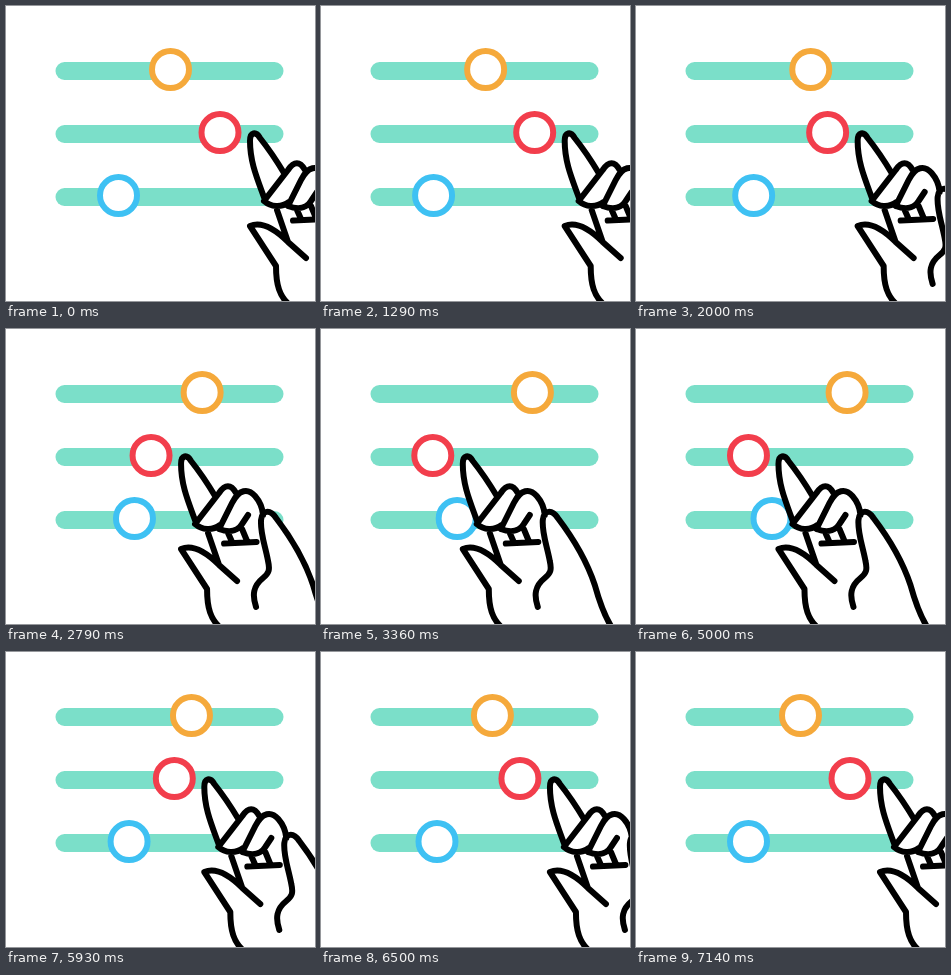
Write an HTML page with a canvas that moves like this. It is 309 px wide and 295 px high and loops after 7.21 s.

```html
<!DOCTYPE html>
<html lang="en">
<head>
<meta charset="utf-8">
<title>Sliders</title>
<style>
html, body { margin: 0; width: 100%; height: 100%; overflow: hidden; background: #fff; }
canvas { display: block; }
</style>
</head>
<body>
<canvas id="stage" width="309" height="295"></canvas>
<script>
const ctx = document.getElementById('stage').getContext('2d');
const LOOP = 7210, START = 1200, TURN = 4172, END = 7143, FPS = 14;

// Each knob travels from x to x + travel and back.
const sliders = [
  { y: 65, x: 164.5, travel: 57.5, color: '#f5a93b' },
  { y: 128, x: 214, travel: -125.3, color: '#f23e4c' },
  { y: 191, x: 112.5, travel: 29, color: '#3ec1f3' }
];

// The hand is drawn relative to a red knob at x = 91.
const HAND_X = 91;
const body = new Path2D(
  'M162 300C150 291 147 278 147 260L121 220C133 215 147 224 159 236' +
  'L148 203L135 195C127 172 121 156 121 135C121 127 127 125 131 132' +
  'Q143 147 155 167C162 158 169 153 176 164C182 160 187 161 192 164' +
  'C199 170 203 178 203 185C207 180 211 182 216 189' +
  'C232 210 245 232 253 256Q261 285 271 300Z');
const lines = new Path2D(
  // index finger
  'M136 194C128 172 121 156 121 135C121 126 127 125 131 132Q143 147 155 167' +
  // folded middle finger
  'M135 195L159 164C165 155 171 155 176 164' +
  'M135 195C142 201 152 202 160 196' +
  // folded ring finger
  'M159 200L172 174C179 160 188 159 195 167Q202 175 203 186' +
  'M159 200C172 205 179 200 182 195L188 186' +
  // knuckle marks
  'M168 204L172 213M182 200L187 212M164 214.5L196.500 213' +
  // thumb and wrist
  'M148 204L159 236' +
  'M177 252L159 236C147 224 133 215 121 220L147 260C147 278 150 291 162 300' +
  // little finger and outer edge
  'M196 278C192 266 193 257 203 249C209 244 210 241 208 232' +
  'C205 216 200 204 201 191C202 181 210 180 216 189' +
  'C232 210 245 232 253 256Q261 285 271 300');

const ease = p => p * p * (3 - 2 * p);
const clamp = p => Math.min(1, Math.max(0, p));

function progress(t) {
  return t < TURN
    ? ease(clamp((t - START) / (TURN - START)))
    : ease(clamp((END - t) / (END - TURN)));
}

function drawBar(y) {
  ctx.strokeStyle = '#7bdfc9';
  ctx.lineWidth = 18;
  ctx.beginPath();
  ctx.moveTo(58.5, y);
  ctx.lineTo(268.5, y);
  ctx.stroke();
}

function drawKnob(x, y, color) {
  ctx.beginPath();
  ctx.arc(x, y, 18.5, 0, Math.PI * 2);
  ctx.fillStyle = '#fff';
  ctx.fill();
  ctx.strokeStyle = color;
  ctx.lineWidth = 6;
  ctx.stroke();
}

function drawHand(dx) {
  ctx.save();
  ctx.translate(dx, 0);
  ctx.fillStyle = '#fff';
  ctx.fill(body);
  ctx.strokeStyle = '#000';
  ctx.lineWidth = 6;
  ctx.stroke(lines);
  ctx.restore();
}

function draw(t) {
  const p = progress(t);
  ctx.fillStyle = '#fff';
  ctx.fillRect(0, 0, 309, 295);
  ctx.lineCap = ctx.lineJoin = 'round';
  for (const s of sliders) {
    drawBar(s.y);
    drawKnob(s.x + s.travel * p, s.y - 1.5, s.color);
  }
  drawHand(sliders[1].x + sliders[1].travel * p - HAND_X);
}

const origin = performance.now();

function tick() {
  const t = (performance.now() - origin) % LOOP;
  const step = Math.floor((t + 5) * FPS / 1000);
  draw(step * 1000 / FPS);
  requestAnimationFrame(tick);
}
tick();
</script>
</body>
</html>
```
